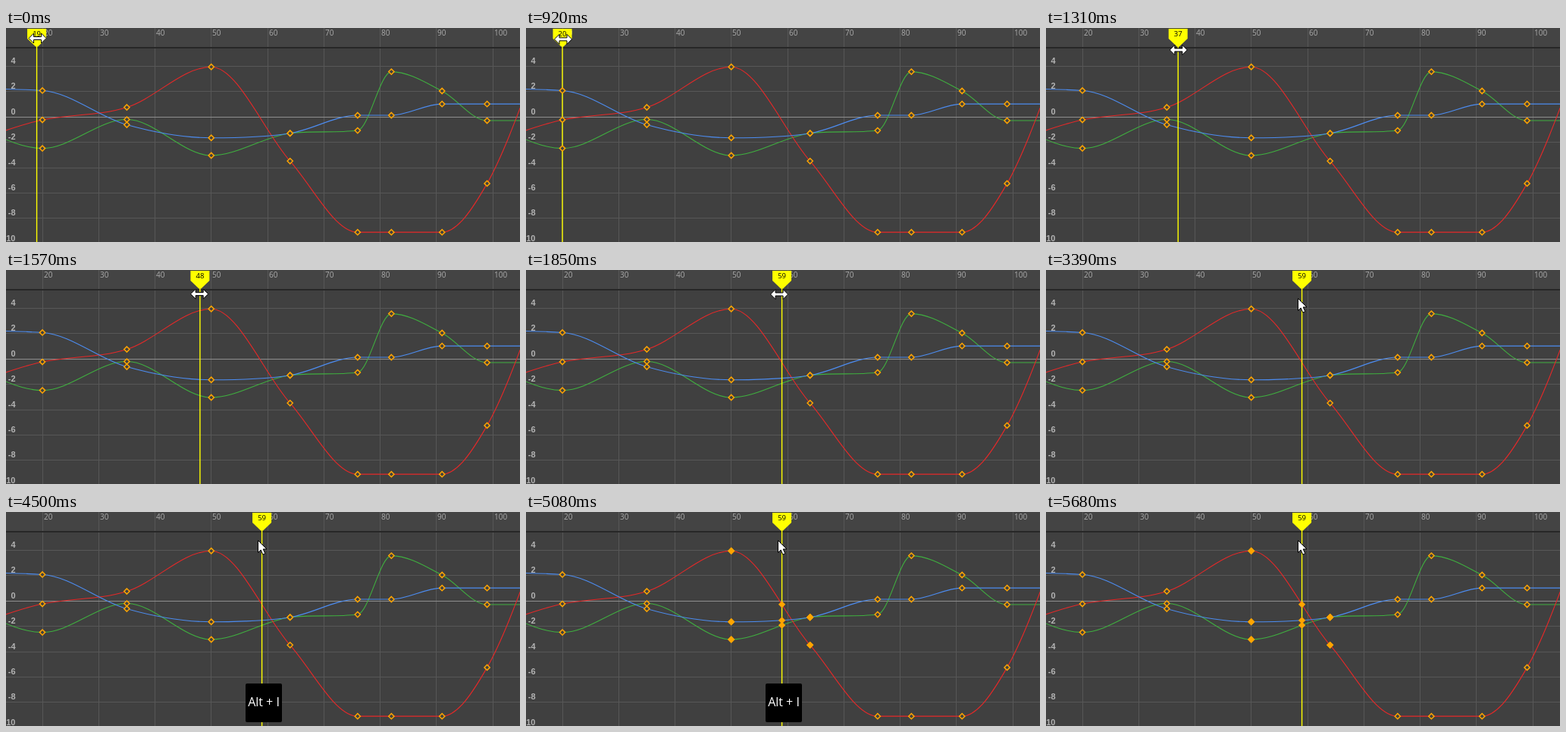
These frames come from a looping animation (678x282 px, 8.03 s). An HTML page:

```html
<!DOCTYPE html>
<html lang="en">
<head>
<meta charset="utf-8">
<title>Curve editor</title>
<style>
  html, body { margin: 0; width: 100%; height: 100%; overflow: hidden; background: #404040; }
  svg { display: block; width: 678px; height: 282px; }
  .grid { stroke: #575757; shape-rendering: crispEdges; }
  .zero { stroke: #8e8e8e; }
  .ruler { font: 10px "Open Sans", "Noto Sans", sans-serif; fill: #acacac; }
  .scale { font: bold 11px "Liberation Sans", Arial, sans-serif; fill: #b4b4b4; text-anchor: end; }
  .curve { fill: none; stroke-width: 1.1; }
  .key { fill: #404040; stroke: #ffa500; stroke-width: 1.5; }
  .on { fill: #ffa500; }
  .flag text { font: 9.5px "Open Sans", "Noto Sans", sans-serif; text-anchor: middle; }
  .popup text { font: 16px "Open Sans", "Noto Sans", sans-serif; fill: #fff; text-anchor: middle; }
  .cursor { fill: #fff; stroke: #000; }
</style>
</head>
<body>
<svg viewBox="0 0 678 282">
  <rect width="678" height="25" fill="#444"/>
  <g id="grid"></g>
  <g id="curves"></g>
  <rect y="25" width="678" height="2" fill="#272727"/>
  <rect id="line" y="24" width="1.4" height="258" fill="#ff0"/>
  <g id="keys"></g>
  <g id="newKeys"></g>
  <g id="flag" class="flag">
    <path d="M-12.5 1H12.5V14L1.5 24.5H-1.5L-12.5 14Z" fill="#ff0"/>
    <text id="number" y="11"></text>
  </g>
  <g id="popup" class="popup">
    <rect x="316" y="226" width="48" height="51" rx="2"/>
    <text x="340" y="256">Alt + I</text>
  </g>
  <path id="resize" class="cursor" d="M-11.5 0L-5 -6.5V-2H5V-6.5L11.5 0L5 6.5V2H-5V6.5Z"/>
  <path id="pointer" class="cursor" d="M.5 .5V16.5L4.2 13L6.8 19L9.8 17.7L7.2 11.9H12Z"/>
</svg>
<script>
const LOOP = 8030;
const NS = "http://www.w3.org/2000/svg";
const $ = id => document.getElementById(id);
const frameX = f => 48 + 7.425 * (f - 20);
const valueY = v => 117.2 - 16.7 * v;

function add(parent, tag, attrs, text) {
  const el = document.createElementNS(NS, tag);
  for (const name in attrs) el.setAttribute(name, attrs[name]);
  if (text !== undefined) el.textContent = text;
  return $(parent).appendChild(el);
}

for (let f = 20; f <= 100; f += 10) {
  const x = Math.floor(frameX(f)) + 0.5;
  add("grid", "path", { class: "grid", d: `M${x} 0V282` });
  add("grid", "text", { class: "ruler", x: x + 1.5, y: 10 }, f);
}
for (let v = 4; v >= -10; v -= 2) {
  const y = Math.floor(valueY(v)) + 0.5;
  add("grid", "path", { class: v ? "grid" : "grid zero", d: `M0 ${y}H678` });
  add("grid", "text", { class: "scale", x: 12.5, y: y - 3.5 }, v);
}

// Key values per curve; the first and last keys lie off stage.
const frames = [0, 20, 35, 50, 64, 76, 82, 91, 99, 120];
const curves = {
  "#3fae3f": [.33, -2.48, -.2, -3.04, -1.29, -1.07, 3.57, 2.05, -.29, -.29],
  "#e62828": [-2.48, -.23, .76, 3.95, -3.48, -9.1, -9.1, -9.1, -5.25, 13.5],
  "#4c8cf0": [2.26, 2.08, -.62, -1.65, -1.29, .13, .13, 1.02, 1.02, 1.02]
};

// Smooth tangents that stay flat at peaks and never overshoot a neighbour.
function slopes(points) {
  const secant = (a, b) => (b.y - a.y) / (b.x - a.x);
  return points.map((p, i) => {
    const a = points[i - 1], b = points[i + 1];
    if (!a || !b) return 0;
    const s = secant(a, p), n = secant(p, b);
    if (s * n <= 0) return 0;
    return Math.sign(s) * Math.min(Math.abs(secant(a, b)), 3 * Math.abs(s), 3 * Math.abs(n));
  });
}

function curvePath(points) {
  const m = slopes(points);
  return points.reduce((d, p, i) => {
    if (!i) return `M${p.x} ${p.y}`;
    const a = points[i - 1], h = (p.x - a.x) / 3;
    return `${d}C${a.x + h} ${a.y + m[i - 1] * h} ${p.x - h} ${p.y - m[i] * h} ${p.x} ${p.y}`;
  }, "");
}

function addKey(layer, x, y, look) {
  add(layer, "path", { class: look, d: `M${x} ${y - 3.6}l3.6 3.6l-3.6 3.6l-3.6 -3.6Z` });
}

for (const [stroke, values] of Object.entries(curves)) {
  const points = values.map((v, i) => ({ x: frameX(frames[i]), y: valueY(v) }));
  const path = add("curves", "path", { class: "curve", stroke, d: curvePath(points) });
  points.forEach(({ x, y }, i) => {
    addKey("keys", x, y, "key");
    if (frames[i] === 50 || frames[i] === 64) addKey("newKeys", x, y, "key on");
  });

  // Find where the curve crosses the playhead's resting place.
  const target = frameX(59);
  let low = 0, high = path.getTotalLength();
  while (high - low > 0.05) {
    const mid = (low + high) / 2;
    if (path.getPointAtLength(mid).x < target) low = mid;
    else high = mid;
  }
  addKey("newKeys", target, path.getPointAtLength(low).y, "key on");
}

const ramp = (t, from, to) => Math.min(1, Math.max(0, (t - from) / (to - from)));
const show = (id, on) => $(id).style.display = on ? "" : "none";
const place = (id, x, y) => $(id).setAttribute("transform", `translate(${x} ${y})`);

// The drag is sampled in coarse steps, like a screen recording.
const DRAG = 920, STEP = 77, SPEED = 0.0448;
function playhead(t) {
  if (t < DRAG) return 19;
  const elapsed = Math.floor((t - DRAG) / STEP) * STEP;
  return Math.min(59, Math.round(20 + elapsed * SPEED));
}

function draw(now) {
  const t = now % LOOP;
  const frame = playhead(t);
  const x = frameX(frame);
  place("flag", x, 0);
  $("number").textContent = frame;
  $("line").setAttribute("x", x - 0.7);

  const p = ramp(frame, 19, 59);
  place("resize", x + 1 - 4.5 * p ** 3, 32 - 18.5 * (1 - p) ** 3);
  place("pointer", 332, 34 + Math.round(3 * ramp(t, 3210, 3390)));
  show("resize", t < 2480);
  show("pointer", t >= 2480);

  show("newKeys", t >= 4660);
  show("popup", t >= 4500 && t < 5680);
  $("popup").style.opacity = t < 5620 ? 1 : 0.5;
}

const start = performance.now();
function tick() {
  draw(performance.now() - start);
  requestAnimationFrame(tick);
}
tick();
</script>
</body>
</html>
```
